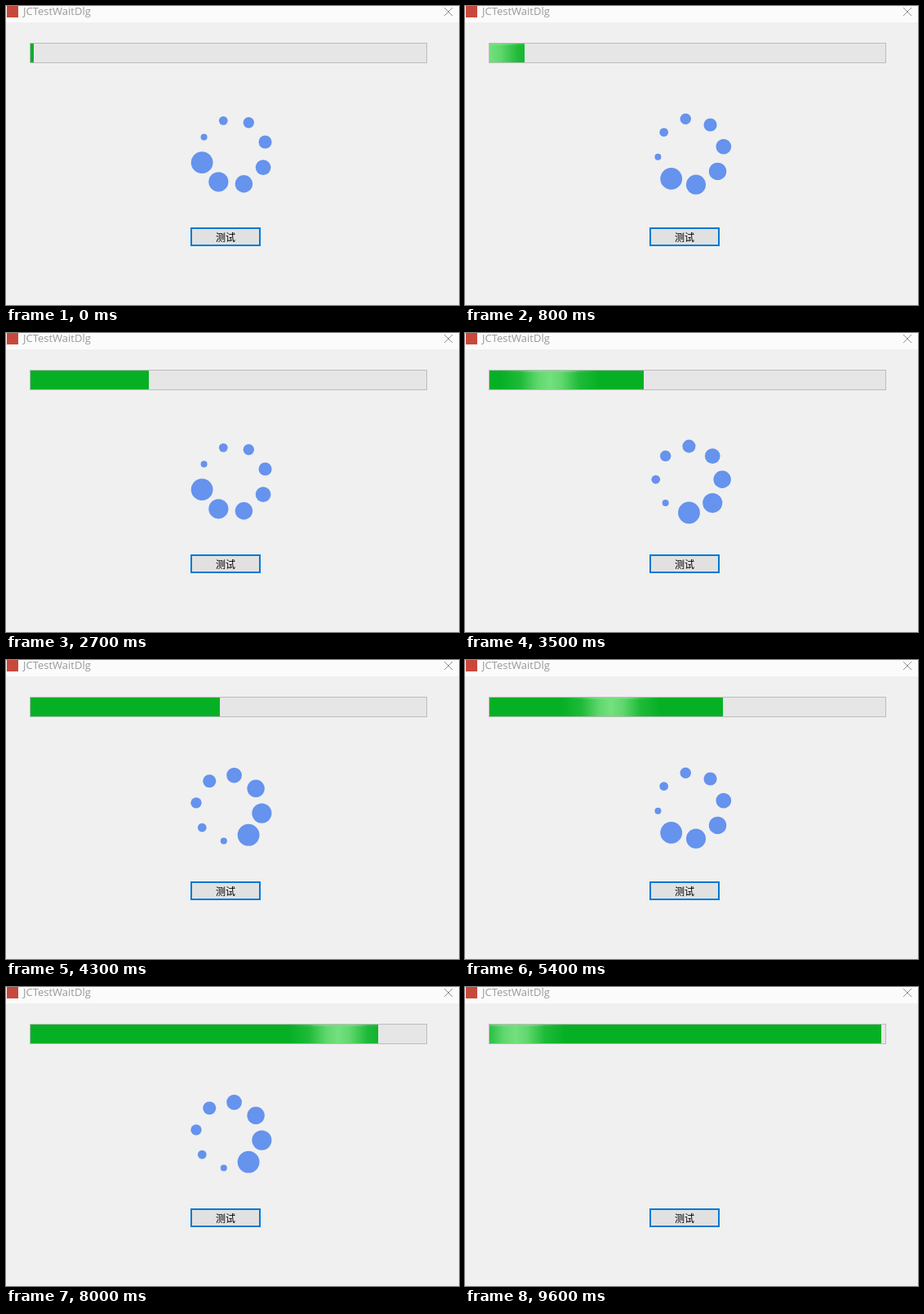
These frames come from a looping animation (555x366 px, 9700 ms). An HTML page with a canvas:

```html
<!DOCTYPE html>
<html lang="zh">
<head>
<meta charset="utf-8">
<style>
html, body { margin: 0; width: 555px; height: 366px; overflow: hidden; background: #f0f0f0; }
canvas, svg { position: absolute; left: 0; top: 0; display: block; }
.title { font: 13px "Open Sans", "Noto Sans", sans-serif; fill: #999; }
.label { font: 12px "Noto Sans CJK SC", "Noto Sans CJK", sans-serif; fill: #000; }
</style>
</head>
<body>
<canvas id="stage" width="555" height="366"></canvas>
<svg width="555" height="366">
  <text class="title" x="21" y="11">JCTestWaitDlg</text>
  <text class="label" x="269" y="287.5" text-anchor="middle">测试</text>
</svg>
<script>
const ctx = document.getElementById('stage').getContext('2d');
const LOOP = 9700, STEP = 100, SPINNER_END = 9000;
const BAR = { x: 30, y: 46, w: 485, h: 23 };
const SHEEN_STARTS = [600, 1750, 3050, 4700, 6540, 9290];
const SHEEN = { width: 120, speed: 0.3 };
const rad = deg => deg * Math.PI / 180;

function rect(color, x, y, w, h) {
  ctx.fillStyle = color;
  ctx.fillRect(x, y, w, h);
}

function drawWindow() {
  rect('#f0f0f0', 0, 0, 555, 366);
  rect('#fbfbfb', 0, 0, 555, 20);
  rect('#c8493c', 1, 0, 14, 14);

  ctx.strokeStyle = '#8f8f8f';
  ctx.lineWidth = 1;
  ctx.beginPath();
  ctx.moveTo(537, 2);
  ctx.lineTo(547, 12);
  ctx.moveTo(547, 2);
  ctx.lineTo(537, 12);
  ctx.stroke();

  rect('#0078d7', 226, 271, 86, 23);
  rect('#e1e1e1', 228, 273, 82, 19);
}

function drawSheen(time, filled) {
  const start = SHEEN_STARTS.filter(s => s <= time).pop();
  if (start === undefined) return;
  const front = BAR.x - 1 + (time - start) * SHEEN.speed;
  const left = Math.max(BAR.x, front - SHEEN.width);
  const width = Math.min(BAR.x + filled, front) - left;
  if (width <= 0) return;

  const glow = ctx.createLinearGradient(front - SHEEN.width, 0, front, 0);
  const stops = [[0, 0], [0.2, 0.22], [0.38, 0.82], [0.5, 1], [0.62, 0.82], [0.8, 0.22], [1, 0]];
  for (const [at, alpha] of stops) glow.addColorStop(at, `rgba(116, 224, 126, ${alpha})`);
  rect(glow, left, BAR.y, width, BAR.h);
  rect(glow, left, BAR.y, width, 2);
}

function drawProgress(time) {
  const percent = Math.min(99, Math.floor(1.185 + 1.089 * time / STEP));
  const filled = Math.floor(BAR.w * percent / 100);
  rect('#bcbcbc', BAR.x - 1, BAR.y - 1, BAR.w + 2, BAR.h + 2);
  rect('#e6e6e6', BAR.x, BAR.y, BAR.w, BAR.h);
  rect('#06b025', BAR.x, BAR.y, filled, BAR.h);
  drawSheen(time, filled);
}

function drawSpinner(time) {
  const tick = 4 + Math.floor(0.8 + 1.086 * time / STEP);
  const lead = 18 + 36 * tick;
  // The ring sits slightly off its pivot, so its centre orbits too.
  const cx = 276.8 + 3.74 * Math.cos(rad(lead + 141));
  const cy = 182.2 + 3.74 * Math.sin(rad(lead + 141));
  ctx.fillStyle = '#6593ed';
  for (let i = 0; i < 8; i++) {
    const angle = rad(lead - 45 * i);
    ctx.beginPath();
    ctx.arc(cx + 40.7 * Math.cos(angle), cy + 40.7 * Math.sin(angle), 13.4 - 1.34 * i, 0, 2 * Math.PI);
    ctx.fill();
  }
}

function frame() {
  const time = Math.floor(performance.now() % LOOP / STEP) * STEP;
  drawWindow();
  drawProgress(time);
  if (time < SPINNER_END) drawSpinner(time);
  requestAnimationFrame(frame);
}
frame();
</script>
</body>
</html>
```
